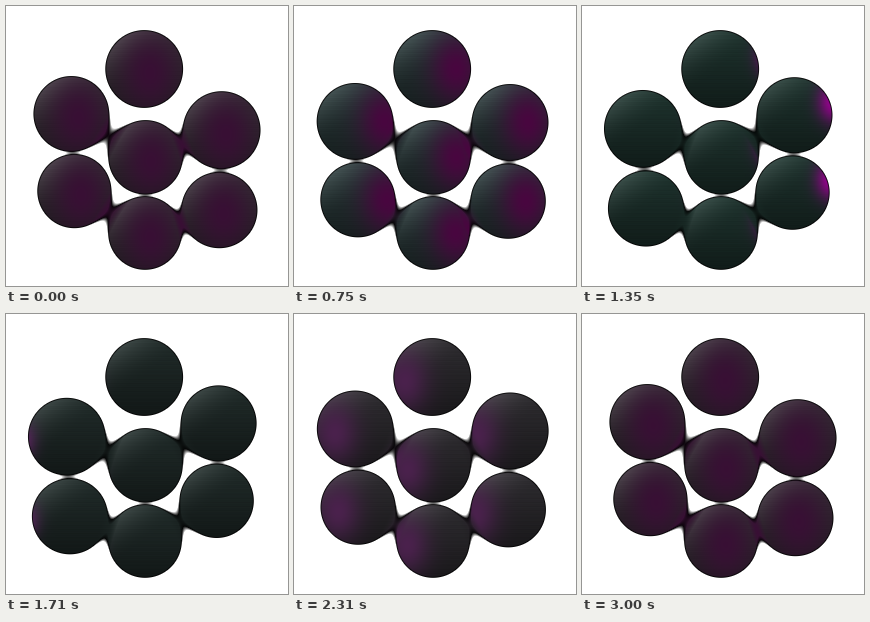
An HTML page with a canvas for the animation above (3030 ms loop, 282 by 280 pixels).

```html
<!DOCTYPE html>
<html lang="en">
<head>
<meta charset="utf-8">
<title>Molecule</title>
<style>
html, body { margin: 0; width: 100%; height: 100%; overflow: hidden; background: #fff; }
canvas { display: block; width: 282px; height: 280px; }
</style>
</head>
<body>
<canvas id="stage" width="282" height="280"></canvas>
<script>
const W = 282, H = 280, LOOP = 3030, STEP = 30;
const ctx = document.getElementById('stage').getContext('2d');
const image = ctx.createImageData(W, H);
const px = image.data;

const rgb = h => [0, 2, 4].map(i => parseInt(h.slice(i, i + 2), 16));
const clamp = (v, a, b) => Math.min(b, Math.max(a, v));
const mix = (a, b, t) => a + (b - a) * t;

// time, body colour, glow colour, glow centre x and y on the sphere, glow size
const looks = [
  [0, '2a262a', '380f34', 0.15, 0.1, 0.75],
  [480, '282b2b', '42083c', 0.4, 0.1, 0.62],
  [750, '1f2b2b', '48063f', 0.62, 0, 0.65],
  [1350, '172723', '980090', 1.35, -0.35, 0.38],
  [1590, '182220', '600060', 1.8, -0.35, 0.35],
  [1620, '182220', '602064', -1.7, 0.1, 0.35],
  [2070, '1d1f20', '5a2c60', -1.15, 0.15, 0.42],
  [2580, '2a252a', '381436', -0.2, 0.05, 0.8]
].map(([t, body, glow, ...spot]) => ({ t, v: [...rgb(body), ...rgb(glow), ...spot] }));
looks.push({ t: LOOP, v: looks[0].v });

function lookAt(t) {
  const i = looks.findIndex(l => l.t > t);
  const a = looks[i - 1], b = looks[i];
  const u = (t - a.t) / (b.t - a.t);
  return a.v.map((v, n) => mix(v, b.v[n], u));
}

// A ball on a tilted orbit; side is -1 for left, 1 for right
function orbit(side, cy, rx, ry, deg, r) {
  const a = deg * Math.PI / 180;
  return { x: 138.4 + side * rx * Math.cos(a), y: cy - ry * Math.sin(a), r: r - 2 * Math.sin(a) };
}

// k sets how far two balls melt together
function bond(a, b, thick) {
  const gap = Math.max(0.8, Math.hypot(a.x - b.x, a.y - b.y) - a.r - b.r);
  return { a, b, k: thick ? 10 + 1.25 * gap : 2 * gap + 0.3 };
}

function pose(t) {
  const c = Math.cos(2 * Math.PI * t / LOOP);
  const top = { x: 138.2, y: 63, r: 38.9 };
  const mid = { x: 139.5, y: 151.3, r: 37.2 };
  const low = { x: 139, y: 227, r: 36.8 };
  const ul = orbit(-1, 119.5, 78, 33, 7 + 13.5 * c, 38.6);
  const ur = orbit(1, 119.5, 78, 33, 5.5 - 13.5 * c, 38.6);
  const ll = orbit(-1, 198, 75, 36, 6.5 + 14.5 * c, 37.8);
  const lr = orbit(1, 198, 76, 36, 4.8 - 14.5 * c, 37.8);
  return [
    { a: top, b: top, k: 0.01 },
    bond(ul, mid, true), bond(ur, mid, true),
    bond(ll, low, true), bond(lr, low, true),
    bond(ul, ll), bond(ur, lr), bond(mid, low)
  ];
}

function draw(t) {
  const bonds = pose(t), look = lookAt(t);
  const [gx, gy, size] = look.slice(6);
  px.fill(255);
  for (let y = 0; y < H; y++) {
    const streak = 1 + 0.05 * Math.sin(y * 2.3) * Math.sin(y * 0.71);
    for (let x = 0; x < W; x++) {
      let best = 9, nx = 0, ny = 0, cx = 0;
      const qx = x + 0.5, qy = y + 0.5;
      for (const { a, b, k } of bonds) {
        const ax = qx - a.x, ay = qy - a.y, bx = qx - b.x, by = qy - b.y;
        const da = Math.hypot(ax, ay) - a.r, db = Math.hypot(bx, by) - b.r;
        const h = Math.max(0, 1 - Math.abs(da - db) / k);
        const d = Math.min(da, db) - (a === b ? 0 : h * h * k / 4);
        if (d < best) {
          best = d;
          const w = clamp(0.5 + (da - db) / (2 * k), 0, 1);
          nx = mix(ax / a.r, bx / b.r, w);
          ny = mix(ay / a.r, by / b.r, w);
          cx = mix(a.x, b.x, w);
        }
      }
      if (best >= 0.5) continue;
      const cover = clamp(0.5 - best, 0, 1);
      const rim = clamp((-best - 0.2) / 1.3, 0, 1);
      // Perspective turns the outer balls a little away from the viewer
      const dx = nx + 0.25 * Math.abs(gx) * (cx - 138) / 77 - gx;
      const dy = 0.75 * (ny - gy);
      const glow = Math.exp(-(dx * dx + dy * dy) / (size * size));
      const sheen = 30 * Math.max(0, -0.6 * nx - 0.8 * ny) ** 2;
      const light = (1 - 0.3 * ny) * streak;
      const o = (y * W + x) * 4;
      for (let n = 0; n < 3; n++) {
        const body = look[n] * light + sheen;
        px[o + n] = mix(255, mix(body, look[n + 3], glow) * rim, cover);
      }
    }
  }
  ctx.putImageData(image, 0, 0);
}

let start = null, last = -1;
function frame(now) {
  if (start === null) start = now;
  const t = Math.floor(((now - start) % LOOP) / STEP) * STEP;
  if (t !== last) draw(last = t);
  requestAnimationFrame(frame);
}
draw(0);
requestAnimationFrame(frame);
</script>
</body>
</html>
```
